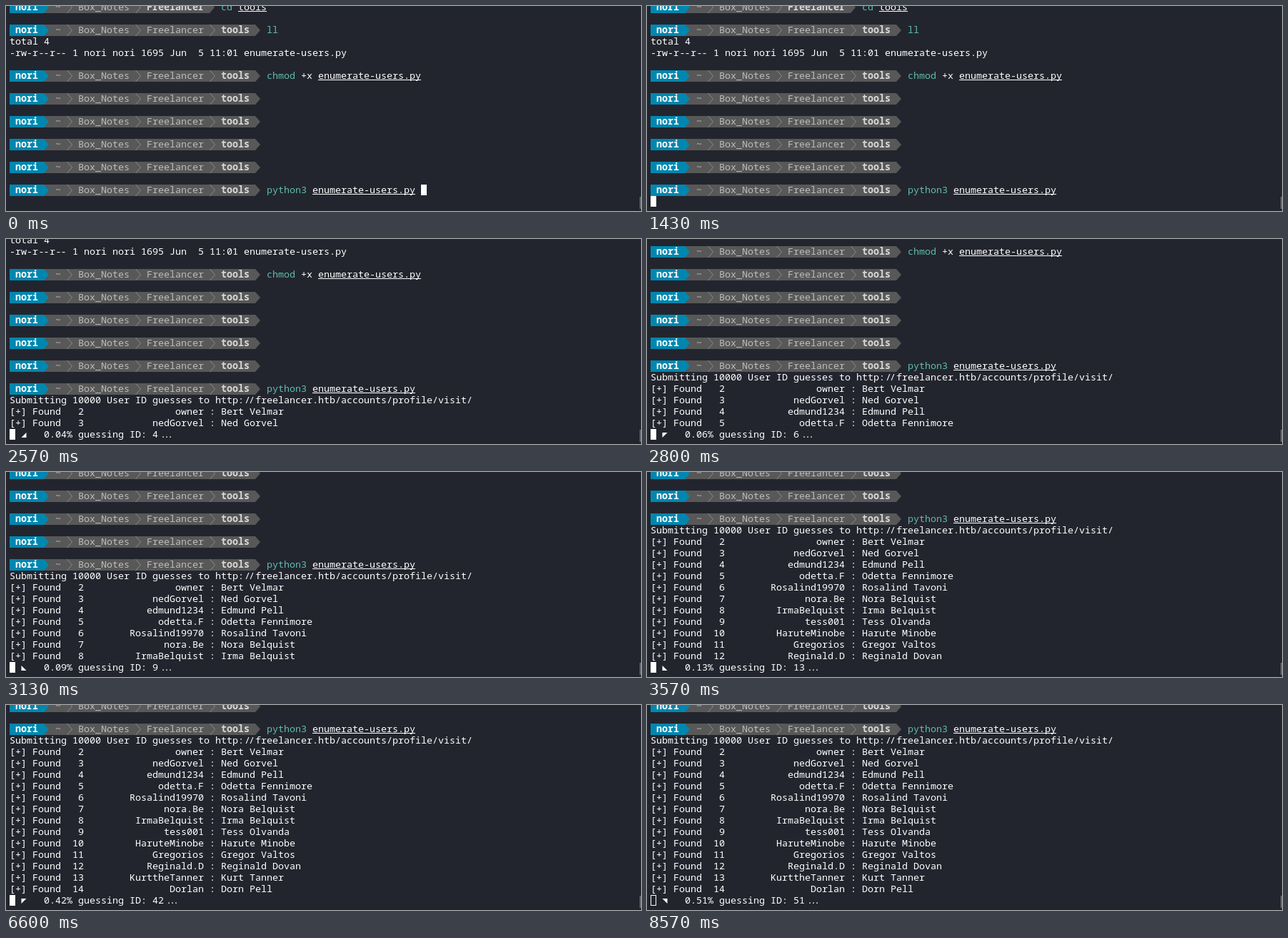
An HTML page with a canvas that plays this animation: 889x287 px, repeating every 8.61 s.

```html
<!DOCTYPE html>
<html lang="en">
<head>
<meta charset="utf-8">
<title>Terminal session</title>
<style>
html, body { margin: 0; width: 100%; height: 100%; overflow: hidden; background: #23252e; }
canvas { display: block; width: 889px; height: 287px; }
</style>
</head>
<body>
<canvas id="stage"></canvas>
<script>
const W = 889, H = 287, LOOP = 8610;
const CELL = 8, ROW = 16, LEFT = 5, TOP = -6, LAST_ROW = 17;
const BG = '#23252e', FG = '#ffffff', BLUE = '#0087af', GRAY = '#585858';
const DIM = '#bcbcbc', LINE = '#8a8a8a', TEAL = '#5ebdab';
const ENTER = 1430, START = 1970, BLUR = 8570;
const USER = 'nori', SCRIPT = 'enumerate-users.py';

const canvas = document.getElementById('stage');
const ctx = canvas.getContext('2d');
const dpr = window.devicePixelRatio || 1;
canvas.width = Math.round(W * dpr);
canvas.height = Math.round(H * dpr);
ctx.scale(dpr, dpr);

// Runs of progress ticks: first time, last time, count
const ticks = [
  [2270, 2430, 3], [2570, 2800, 3], [2930, 3230, 4], [3370, 3430, 2],
  [3570, 4430, 11], [4530, 5370, 11], [5470, 5970, 7], [6600, 6600, 1],
  [7770, 7770, 1], [7930, 8230, 5], [8370, 8500, 3]
].flatMap(([from, to, n]) =>
  Array.from({ length: n }, (_, i) => from + (n > 1 ? (to - from) * i / (n - 1) : 0)));

const accounts = [
  ['owner', 'Bert Velmar'],
  ['nedGorvel', 'Ned Gorvel'],
  ['edmund1234', 'Edmund Pell'],
  ['odetta.F', 'Odetta Fennimore'],
  ['Rosalind19970', 'Rosalind Tavoni'],
  ['nora.Be', 'Nora Belquist'],
  ['IrmaBelquist', 'Irma Belquist'],
  ['tess001', 'Tess Olvanda'],
  ['HaruteMinobe', 'Harute Minobe'],
  ['Gregorios', 'Gregor Valtos'],
  ['Reginald.D', 'Reginald Dovan'],
  ['KurttheTanner', 'Kurt Tanner'],
  ['Dorlan', 'Dorn Pell']
];

const colX = col => LEFT + col * CELL;
const rowY = row => TOP + row * ROW;

// Repeated punctuation sits closer together, like coding ligatures
const TIGHTEN = { '.': 3, '/': 1, '-': 0.5 };

function text(str, col, row, color = FG, bold = false) {
  ctx.font = `${bold ? 'bold ' : ''}13.333px "Noto Sans Mono", "DejaVu Sans Mono", monospace`;
  ctx.fillStyle = color;
  for (let i = 0; i < str.length; i++) {
    const c = str[i];
    if (c === ' ') continue;
    const shift = (TIGHTEN[c] || 0) * ((str[i + 1] === c) - (str[i - 1] === c));
    ctx.fillText(c, colX(col + i) + shift, rowY(row) + 12);
  }
}

function underlined(str, col, row) {
  text(str, col, row);
  ctx.fillRect(colX(col), rowY(row) + 13, str.length * CELL, 1);
}

function polygon(points, color) {
  ctx.fillStyle = color;
  ctx.beginPath();
  points.forEach(([x, y]) => ctx.lineTo(x, y));
  ctx.fill();
}

function arrow(col, row, color) {
  const x = colX(col), y = rowY(row);
  polygon([[x, y], [x + 7, y + ROW / 2], [x, y + ROW]], color);
}

function chevron(col, row) {
  const x = colX(col) + 0.5, y = rowY(row);
  ctx.strokeStyle = LINE;
  ctx.lineWidth = 1;
  ctx.beginPath();
  ctx.moveTo(x, y);
  ctx.lineTo(x + 7, y + ROW / 2);
  ctx.lineTo(x, y + ROW);
  ctx.stroke();
}

// Draws a path prompt, then its command and an underlined argument
function prompt(dirs, plain = '', arg = '') {
  return row => {
    const y = rowY(row);
    const end = dirs.reduce((col, dir) => col + dir.length + 3, 7) - 1;
    ctx.fillStyle = GRAY;
    ctx.fillRect(colX(6), y, (end - 6) * CELL, ROW);
    ctx.fillStyle = BLUE;
    ctx.fillRect(LEFT, y, 6 * CELL, ROW);
    arrow(6, row, BLUE);
    arrow(end, row, GRAY);
    text(USER, 1, row, FG, true);

    let col = 8;
    dirs.forEach((dir, i) => {
      const last = i === dirs.length - 1;
      text(dir, col, row, last ? '#d8d8d8' : DIM, last);
      col += dir.length + 3;
      if (!last) chevron(col - 2, row);
    });

    const [command, ...rest] = plain.split(' ');
    text(command, end + 2, row, TEAL);
    text(rest.join(' '), end + 3 + command.length, row);
    if (arg) underlined(arg, end + 3 + plain.length, row);
  };
}

const plainLine = str => row => text(str, 0, row);
const blank = () => {};

const home = ['~', 'Box_Notes', 'Freelancer'];
const tools = [...home, 'tools'];
const history = [
  prompt(home, 'cd', 'tools'), blank,
  prompt(tools, 'll'),
  plainLine('total 4'),
  plainLine(`-rw-r--r-- 1 ${USER} ${USER} 1695 Jun  5 11:01 ${SCRIPT}`), blank,
  prompt(tools, 'chmod +x', SCRIPT), blank,
  prompt(tools), blank,
  prompt(tools), blank,
  prompt(tools), blank,
  prompt(tools), blank,
  prompt(tools, 'python3', SCRIPT)
];
const banner = plainLine('Submitting 10000 User ID guesses to http://freelancer.htb/accounts/profile/visit/');
const found = accounts.map(([login, name], i) =>
  plainLine(`[+] Found ${String(i + 2).padStart(3)}${login.padStart(21)} : ${name}`));

function cursor(col, row, hollow) {
  const x = colX(col), y = rowY(row);
  ctx.fillStyle = FG;
  ctx.fillRect(x, y, CELL, 15);
  if (hollow) {
    ctx.fillStyle = BG;
    ctx.fillRect(x + 1, y + 1, CELL - 2, 13);
  }
}

// Corner triangle turning clockwise: bottom right, bottom left, top left, top right
function spinner(step, row) {
  const x = colX(2) + 0.5, y = rowY(row) + 5, s = 7;
  const corners = [[x + s, y + s], [x, y + s], [x, y], [x + s, y]];
  corners.splice((step + 2) % 4, 1);
  polygon(corners, FG);
}

function draw(t) {
  ctx.fillStyle = BG;
  ctx.fillRect(0, 0, W, H);

  const running = t >= START;
  const id = ticks.filter(time => time <= t + 0.01).length;
  const hits = Math.max(0, Math.min(accounts.length, id - 2));
  const lines = running ? [...history, banner, ...found.slice(0, hits)] : history;
  const scroll = running ? lines.length - LAST_ROW : 0;
  lines.forEach((line, i) => { if (i >= scroll) line(i - scroll); });

  if (running) {
    text(`${(id / 100).toFixed(2)}% guessing ID: ${id}...`, 6, LAST_ROW);
    spinner(id, LAST_ROW);
  }
  if (t < ENTER) cursor(72, 16, false);
  else cursor(0, LAST_ROW, t >= BLUR);

  // Scrollbar thumb
  ctx.fillStyle = '#63656c';
  ctx.fillRect(887, 267, 2, 17);
}

const begin = performance.now();
function tick() {
  draw((performance.now() - begin) % LOOP);
  requestAnimationFrame(tick);
}
tick();
</script>
</body>
</html>
```
